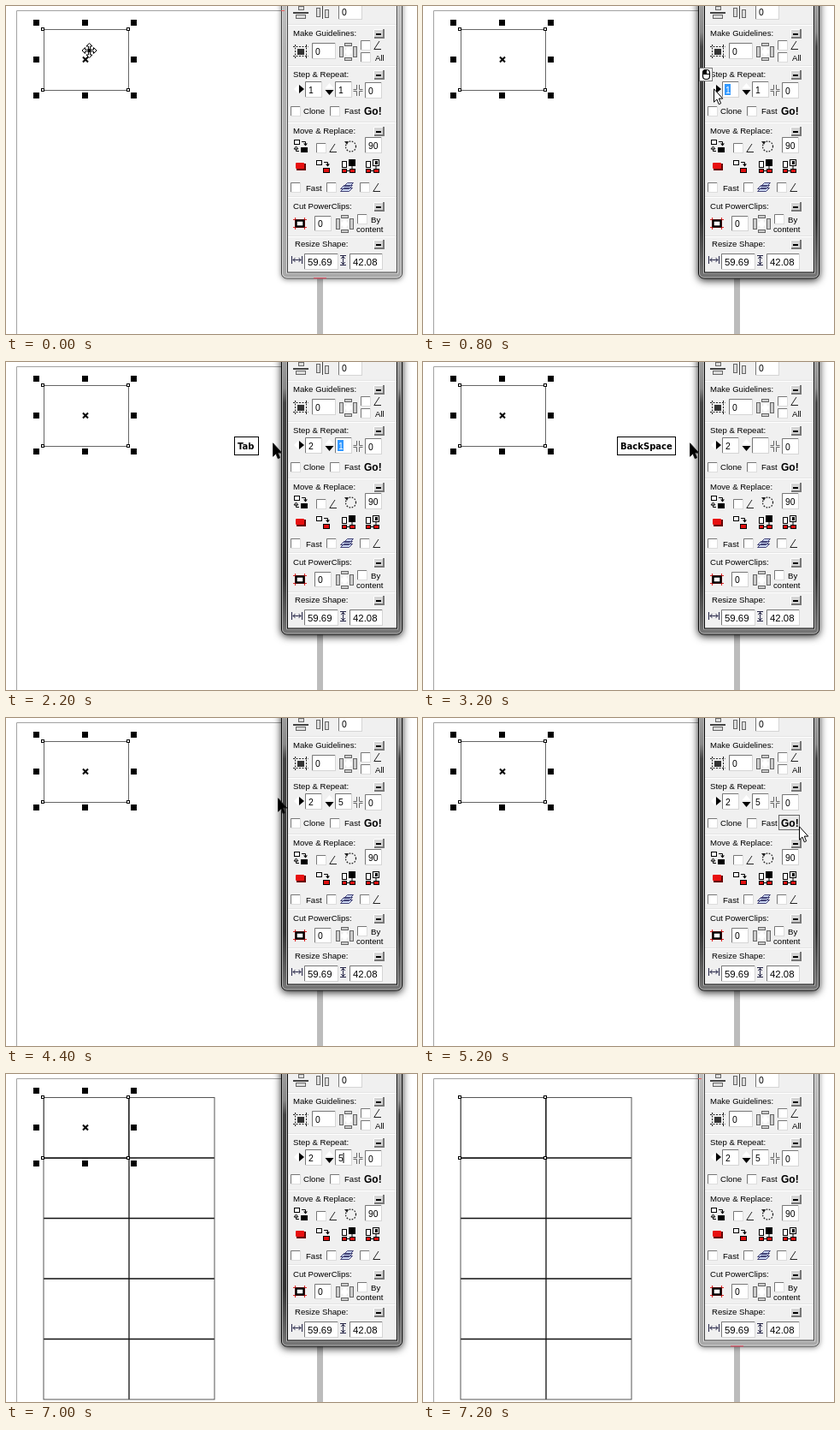
An HTML page for the animation above (8.4 s loop, 481 px wide and 383 px high).

```html
<!DOCTYPE html>
<html lang="en">
<head>
<meta charset="utf-8">
<title>Step and repeat</title>
<style>
  html, body { margin: 0; width: 100%; height: 100%; overflow: hidden; background: #fff; }
  svg { display: block; width: 100%; height: 100%; }
  text { font: 9.6px "Liberation Sans", Arial, sans-serif; fill: #000; white-space: pre; }
  .num { font-size: 10.4px; }
  .wide { font-size: 11.4px; }
  .key { font: bold 10px "DejaVu Sans", Verdana, sans-serif; }
  .go { font: bold 12px "Liberation Sans", Arial, sans-serif; }
  #active { filter: drop-shadow(0 2px 5px rgba(0, 0, 0, .85)); }
  #idle { filter: drop-shadow(0 1px 3px rgba(0, 0, 0, .5)); }
</style>
</head>
<body>
<svg id="stage" viewBox="0 0 481 383"></svg>
<script>
const LOOP = 8400, STEP = 200;

const rect = (x, y, w, h, fill, stroke = 'none', extra = '') =>
  `<rect x="${x}" y="${y}" width="${w}" height="${h}" fill="${fill}" stroke="${stroke}" ${extra}/>`;
const path = (d, stroke = '#000', fill = 'none', extra = '') =>
  `<path d="${d}" stroke="${stroke}" fill="${fill}" ${extra}/>`;
const text = (x, y, s, cls = '') => `<text x="${x}" y="${y}" class="${cls}">${s}</text>`;
const group = (id, body, extra = '') => `<g id="${id}" ${extra}>${body}</g>`;

// Panel controls
const field = (x, y, w, h, value, cls = 'num') =>
  rect(x + .5, y + .5, w - 1, h - 1, '#fff', '#d5d5d5') +
  path(`M${x + .5} ${y + h - 1}V${y + .5}H${x + w - 1}`, '#777') +
  (value ? text(x + 4, y + h - 5, value, cls) : '');
const check = (x, y) =>
  rect(x + .5, y + .5, 11, 11, '#fff', '#ddd') +
  path(`M${x + .5} ${y + 11}V${y + .5}H${x + 11}`, '#777');
const collapse = y =>
  rect(430, y, 13, 11, '#d4d4d4') +
  path(`M430.5 ${y + 11}V${y + .5}H442`, '#fff') +
  path(`M431 ${y + 10}H442V${y}`, '#777', 'none', 'stroke-width="2"') +
  rect(433, y + 5, 6, 2, '#000');
const divider = y => rect(330, y, 127, 1, '#e4e4e4') + rect(330, y + 1, 127, 1, '#fff');
const angle = (x, y) => path(`M${x + 7} ${y}L${x + .8} ${y + 9.5}H${x + 9}`, '#222');
const section = (x, y, s) => text(x, y, s) + collapse(y - 8);
const ring = (x, y) =>
  [[0, 4, 5, 13], [16, 4, 5, 13], [6, 0, 9, 4], [6, 17, 9, 4]]
    .map(([dx, dy, w, h]) => rect(x + dx + .5, y + dy + .5, w - 1, h - 1, '#ccc', '#666')).join('') +
  path(`M${x + 10.5} ${y + 6}v9M${x + 6} ${y + 10.5}h9`, '#fff', 'none', 'stroke-width="4"');
const swap = (x, y, fill) =>
  rect(x + .5, y + .5, 6, 5, '#fff', '#000') +
  path(`M${x + 9} ${y + 2.5}h4.5v3`) +
  path(`M${x + 11} ${y + 4.5}h5l-2.5 3z`, 'none', '#000') +
  rect(x + 8.5, y + 9.5, 7, 5, fill, '#000');
const stack = (x, y, inner) =>
  rect(x + .5, y + 2.5, 5, 7, '#fff', '#000') +
  rect(x + .5, y + 11.5, 5, 4, '#e01010', '#000') +
  rect(x + 8.5, y + .5, 7, 7, inner, '#000') +
  path(`M${x + 12} ${y + 8}v3M${x + 6} ${y + 13.5}h3`) +
  rect(x + 9.5, y + 11.5, 6, 4, '#e01010', '#000');

function panelBody() {
  const grey = '#666';
  return [
    // Align row
    rect(342.5, .5, 6, 4, '#ddd', grey), rect(336, 7, 18, 2, '#444'), rect(339.5, 10.5, 11, 4, '#ddd', grey),
    rect(363.5, 2.5, 4, 10, '#ddd', grey), rect(370, 0, 1, 15, '#444'), rect(373.5, 4.5, 4, 9, '#ddd', grey),
    field(389, -4, 28, 20, '0'),
    [21, 69, 135, 222, 268].map(divider).join(''),

    section(336, 35, 'Make Guidelines:'),
    path('M336 47.5h18M336 58.5h18M338.5 45v16M351.5 45v16', '#222', 'none', 'stroke-dasharray="2 1.5"'),
    rect(341, 50, 8, 7, '#333'),
    field(358, 43, 28, 19, '0'), ring(390, 43),
    check(415, 40), angle(430, 41), check(415, 54), text(432, 64, 'All'),

    section(336, 83, 'Step &amp; Repeat:'),
    path('M342 92l-5 5 5 5z', 'none', '#fff'), path('M343 92l6 5-6 5z', 'none', '#000'),
    field(350, 88, 20, 19), path('M373.5 96l5-6 5 6z', 'none', '#fff'), path('M373.5 98h10l-5 6z', 'none', '#000'),
    field(385, 88, 20, 19),
    path('M410.5 92v5.5h-4M413.5 92v5.5h4M410.5 105v-5.5h-4M413.5 105v-5.5h4', grey),
    field(420, 89, 20, 19, '0'),
    check(333, 117), text(348, 126, 'Clone'), check(379, 117), text(396, 126, 'Fast'),
    group('press', rect(416.5, 113.5, 24, 17, '#e8e8e8', '#666')), text(419, 127, 'Go!', 'go'),

    section(336, 149, 'Move &amp; Replace:'),
    swap(337, 156, '#000'), path('M343 169.5h-3.5v-3M337 167l2.5-3 2.5 3z'),
    check(363, 160), angle(378, 161),
    '<circle cx="403.5" cy="164" r="6" fill="none" stroke="#222" stroke-width="1.3" stroke-dasharray="1.6 1.6"/>',
    path('M396 158l5 0-2 4z', 'none', '#222'), field(420, 153, 20, 19, '90'),
    rect(340, 184, 11, 8, '#600'), rect(339, 183, 10, 7, '#e81010', 'none', 'rx="1"'),
    swap(363, 180, '#e01010'), stack(393, 179, '#000'), stack(421, 179, '#fff'), rect(432, 181, 3, 4, '#000'),
    check(333, 206), text(351, 216, 'Fast'), check(375, 206),
    path('M391.5 213.5l4-4h10l-4 4zM391.5 216.5l4-4h10l-4 4zM395.5 210.5l4-4h7l-4 4z', '#447', '#c8d4f0'),
    check(414, 206), angle(429, 207),

    section(336, 237, 'Cut PowerClips:'),
    path('M336 249.5h16M336 258.5h16M338.5 247v14M349.5 247v14', '#e02020'),
    rect(339.5, 250.5, 9, 7, '#fff', '#000', 'stroke-width="2.4"'),
    field(361, 245, 20, 18, '0'), ring(386, 244),
    check(411, 243), text(427, 253, 'By'), text(410, 264, 'content'),

    section(338, 281, 'Resize Shape:'),
    path('M334.5 292v9M346.5 292v9M336 296.5h9M338.5 294l-2.5 2.5 2.5 2.5M342.5 294l2.5 2.5-2.5 2.5', '#224'),
    field(349, 289, 40, 19, '59.69', 'wide'),
    path('M391 291.5h7M391 302.5h7M394.5 292v10M392 295l2.5-2.5 2.5 2.5M392 299l2.5 2.5 2.5-2.5', '#224'),
    field(402, 289, 39, 19, '42.08', 'wide')
  ].join('');
}

// Two glass window frames: focused is dark, unfocused is light
const frame = (id, edge, fill, shine) => group(id,
  rect(322.5, -20, 141, 338, `url(#${fill})`, edge, 'rx="6"') +
  rect(323.5, -20, 139, 337, 'none', shine, 'rx="5"') +
  rect(328.5, -20, 130, 332, 'none', shine) +
  rect(329.5, -20, 128, 331, '#f0f0f0', edge));
const gradient = (id, stops) =>
  `<linearGradient id="${id}" x2="0" y2="1">${stops.map(([o, c]) =>
    `<stop offset="${o}" stop-color="${c}"/>`).join('')}</linearGradient>`;

const nodes = [[43, 27], [143, 27], [43, 98], [143, 98]]
  .map(([x, y]) => rect(x - 1.5, y - 1.5, 3, 3, '#fff', '#000')).join('');
const handles = [36, 93, 150].flatMap(x => [19, 62, 104].map(y =>
  x === 93 && y === 62 ? path('M90 59.5l6 6m0-6l-6 6', '#000', 'none', 'stroke-width="2.1"')
    : rect(x - 4, y - 3, 7, 7, '#000'))).join('');

let rows = '';
for (let i = 1; i < 5; i++) rows += `M44 ${27.5 + 70.5 * i}H244`;

const mouse =
  rect(.5, .5, 15, 15, '#fff', '#777') +
  rect(4.5, 2.5, 8, 11, '#fff', '#000', 'rx="3.5" stroke-width="1.2"') +
  path('M4.5 7.5V5.5Q4.5 2.5 8.5 2.5V7.5z', '#000', '#000') + path('M4.5 7.5h8');
const label = (id, x, s) => group(id, rect(x + .5, 87.5, 295 - x, 21, '#fff', '#000') + text(x + 4, 102, s, 'key'));
const arm = a => `<path d="M-1 -1V-5H-3.5L0 -8.5 3.5 -5H1V-1Z" transform="rotate(${a})"/>`;

document.getElementById('stage').innerHTML = `<defs>
  ${gradient('dark', [[0, '#aaa'], [.15, '#888'], [.2, '#444'], [.8, '#333'], [1, '#777']])}
  ${gradient('light', [[0, '#c4c4c4'], [.2, '#b2b2b2'], [1, '#a8a8a8']])}</defs>` +
  rect(0, 0, 481, 383, '#fff') +
  path('M12.5 383V5.5H364.5V383', '#a2a2a2') + rect(364, 10, 7, 373, '#bcbcbc') +
  rect(44.5, 27.5, 99, 71, 'none', '#666') +
  group('grid', path(rows + 'M144 27V380', '#111', 'none', 'stroke-width="1.3"') +
    rect(44, 27.5, 200, 352.5, 'none', '#555')) +
  nodes + group('handles', handles) +
  frame('active', '#0a0a0a', 'dark', '#b4b4b4') + frame('idle', '#444', 'light', '#ddd') +
  group('tint', rect(322, 5, 4, 1, '#f06060') + rect(360, 317, 15, 1.5, '#d06070')) +
  panelBody() +
  group('mark1', rect(353, 91, 7, 13, '#3399ff')) + group('mark2', rect(388, 91, 7, 13, '#3399ff')) +
  '<text id="cols" x="354" y="102" class="num"></text><text id="rows" x="389" y="102" class="num"></text>' +
  group('caret', rect(0, 92, 1, 12, '#000')) +
  label('tab', 267, 'Tab') + label('back', 227, 'BackSpace') +
  group('move', [0, 90, 180, 270].map(arm).join('') + path('M-2 0H2M0 -2V2', '#000'),
    'transform="translate(97.5 52)" fill="#fff" stroke="#000"') +
  group('mouse', mouse) +
  group('arrow', '<path d="M.5 .8V16.2L3.9 13 6.3 18.8 8.6 17.7 6.3 12.1H10.8Z"/>');

const el = id => document.getElementById(id);
const show = (id, on) => el(id).setAttribute('display', on ? 'inline' : 'none');
const place = (id, x, y = 0) => el(id).setAttribute('transform', `translate(${x} ${y})`);
const within = (t, ...spans) => spans.some(([a, b]) => t >= a && t < b);

// Pointer path: time, x, y
const route = [[0, 97, 52], [600, 362, 97], [800, 340, 96], [1000, 312, 94], [3600, 312, 94], [3800, 320, 93],
  [4200, 319, 93], [4400, 318, 93], [4600, 318, 93], [5200, 440, 126], [LOOP, 440, 126]];
function pointer(t) {
  const i = route.findIndex(p => p[0] > t);
  const [t0, x0, y0] = route[i - 1], [t1, x1, y1] = route[i];
  const k = (t - t0) / (t1 - t0);
  return [x0 + (x1 - x0) * k, y0 + (y1 - y0) * k];
}

function draw(time) {
  const t = Math.floor(time % LOOP / STEP) * STEP;
  const active = within(t, [800, 7200]);
  const [x, y] = pointer(t);

  show('active', active);
  show('idle', !active);
  show('tint', !active);
  show('grid', t >= 5400);
  show('handles', t < 7200);

  show('move', t < 200);
  show('arrow', within(t, [200, 6400]));
  place('arrow', x, y);
  const black = x < 325;
  el('arrow').setAttribute('fill', black ? '#000' : '#fff');
  el('arrow').setAttribute('stroke', black ? '#222' : '#000');

  show('mouse', within(t, [800, 1600], [5400, 5800]));
  if (t < 5000) place('mouse', Math.round(x) - 17, Math.round(y) - 24);
  else place('mouse', 421, 108);
  show('press', within(t, [5200, 6400]));

  const picked1 = within(t, [800, 1800]), picked2 = within(t, [2200, 2800]);
  show('mark1', picked1);
  show('mark2', picked2);
  el('cols').textContent = t < 1800 ? 1 : 2;
  el('rows').textContent = t < 2800 ? 1 : t < 3800 ? '' : 5;
  el('cols').style.fill = picked1 ? '#fff' : '';
  el('rows').style.fill = picked2 ? '#fff' : '';
  show('caret', within(t, [2800, 3200], [3400, 4200], [6400, 6600], [7000, 7200]));
  place('caret', t < 3800 ? 388 : 394.5);

  show('tab', within(t, [2200, 2600]));
  show('back', within(t, [2800, 3400]));
}

const start = performance.now();
function tick() {
  draw(performance.now() - start);
  requestAnimationFrame(tick);
}
tick();
</script>
</body>
</html>
```
